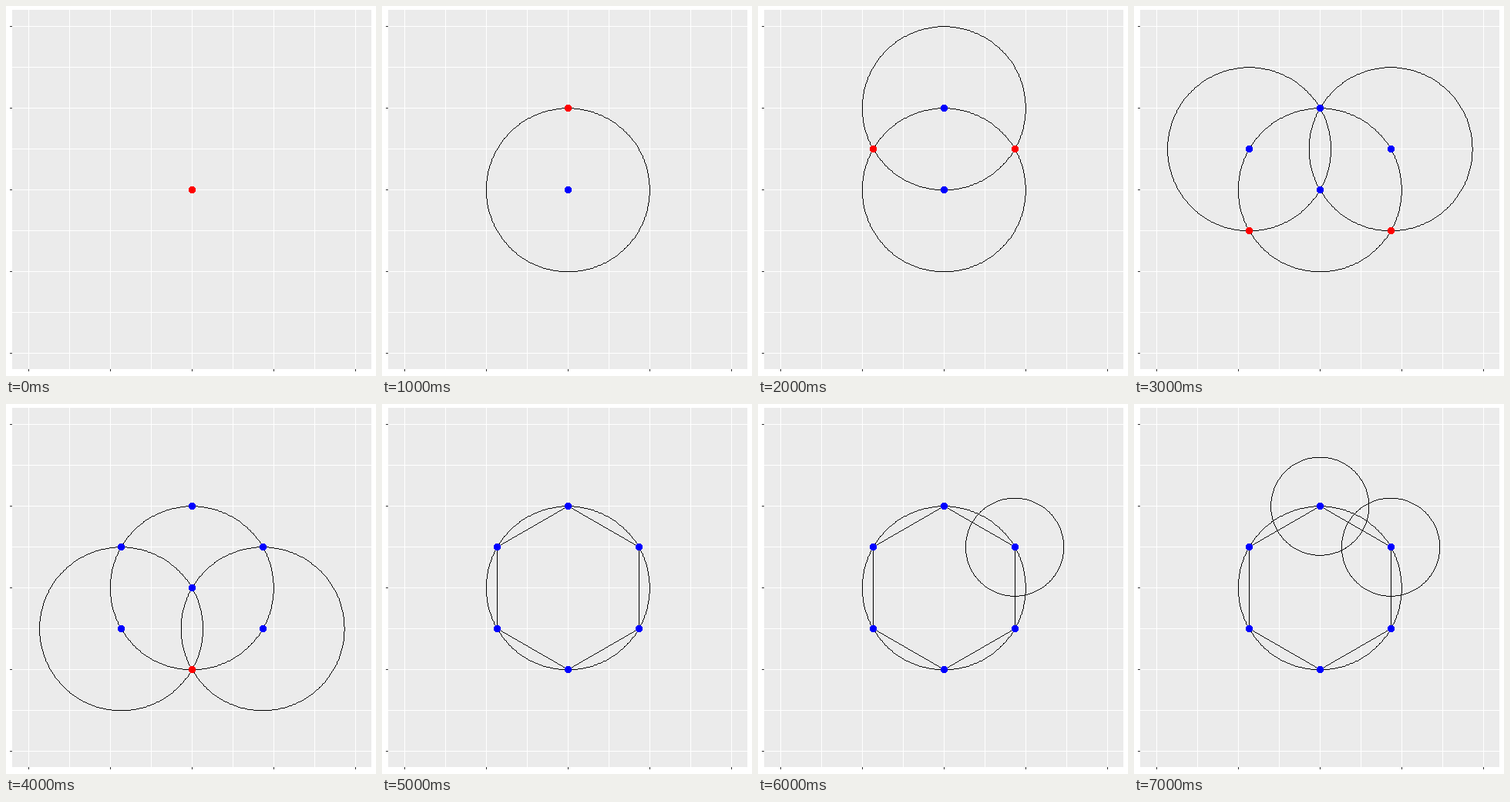
A matplotlib script that plays this animation: 480 px wide and 480 px high, repeating every 8000 ms.

```python
import math

import matplotlib.pyplot as plt
import numpy as np
from matplotlib.animation import FuncAnimation
from matplotlib.patches import Rectangle

SIZE, DPI = 480, 80
CX, CY = 241.25, 238.7
UNIT = 106  # pixels per data unit
DOT = 4.5  # dot radius in pixels
BLACK, BLUE, RED = (0, 0, 0, 255), (0, 0, 255, 255), (255, 0, 0, 255)

fig = plt.figure(figsize=(SIZE / DPI, SIZE / DPI), dpi=DPI, facecolor="white")
ax = fig.add_axes([0, 0, 1, 1])
ax.set_xlim(0, SIZE)
ax.set_ylim(SIZE, 0)
ax.axis("off")


def block(x, y, w, h, color):
    ax.add_patch(Rectangle((x, y), w, h, fc=color, lw=0, antialiased=False))


# Panel, grid lines and axis ticks
block(8, 5, 466, 466, "#ebebeb")
for i in range(9):
    block(29 + 53 * i, 5, 1, 466, "white")
    block(8, 26 + 53 * i, 466, 1, "white")
for i in range(5):
    block(29 + 106 * i, 471, 1, 3, "#333333")
    block(5, 26 + 106 * i, 3, 1, "#333333")

# Crisp one-pixel drawing goes on a transparent layer above the panel
ink = np.zeros((SIZE, SIZE, 4), np.uint8)
layer = ax.imshow(ink, extent=(0, SIZE, SIZE, 0), aspect="auto",
                  interpolation="nearest", zorder=3)
ROWS, COLS = np.mgrid[:SIZE, :SIZE]


def to_pixel(point):
    return math.floor(CX + UNIT * point[0]), math.floor(CY - UNIT * point[1])


def stroke(points):
    """Closed line, one pixel wide, without smoothing."""
    pixels = [to_pixel(p) for p in points]
    for (x0, y0), (x1, y1) in zip(pixels, pixels[1:] + pixels[:1]):
        n = max(abs(x1 - x0), abs(y1 - y0)) + 1
        xs = np.floor(np.linspace(x0, x1, n) + 0.5).astype(int)
        ys = np.floor(np.linspace(y0, y1, n) + 0.5).astype(int)
        ink[ys, xs] = BLACK


def circle(center, radius):
    angles = np.linspace(0, 2 * math.pi, 360, endpoint=False)
    stroke([(center[0] + radius * math.cos(a),
             center[1] + radius * math.sin(a)) for a in angles])


def dot(point, color):
    x, y = to_pixel(point)
    ink[(COLS - x) ** 2 + (ROWS - y) ** 2 <= DOT ** 2] = color


def vertex(k):
    """Hexagon corner k, counted clockwise from the top."""
    angle = math.radians(90 - 60 * k)
    return math.cos(angle), math.sin(angle)


HUB = (0, 0)
V = [vertex(k) for k in range(6)]
TOP, UP_R, LOW_R, BOTTOM, LOW_L, UP_L = V
BASE = (HUB, 1)
SMALL = 0.6

# Each step: circles as (centre, radius), hexagon shown, blue dots, red dots
STEPS = [
    ([], False, [], [HUB]),
    ([BASE], False, [HUB], [TOP]),
    ([BASE, (TOP, 1)], False, [HUB, TOP], [UP_L, UP_R]),
    ([BASE, (UP_L, 1), (UP_R, 1)], False,
     [HUB, TOP, UP_L, UP_R], [LOW_L, LOW_R]),
    ([BASE, (LOW_L, 1), (LOW_R, 1)], False,
     [HUB, TOP, UP_L, UP_R, LOW_L, LOW_R], [BOTTOM]),
    ([BASE], True, V, []),
    ([BASE, (UP_R, SMALL)], True, V, []),
    ([BASE, (UP_R, SMALL), (TOP, SMALL)], True, V, []),
]


def draw(step):
    circles, hexagon, blue, red = STEPS[step]
    ink[:] = 0
    for center, radius in circles:
        circle(center, radius)
    if hexagon:
        stroke(V)
    for p in blue:
        dot(p, BLUE)
    for p in red:
        dot(p, RED)
    layer.set_data(ink)
    return [layer]


anim = FuncAnimation(fig, draw, frames=len(STEPS), interval=1000,
                     init_func=lambda: draw(0), repeat=True, repeat_delay=0)
plt.show()
```
